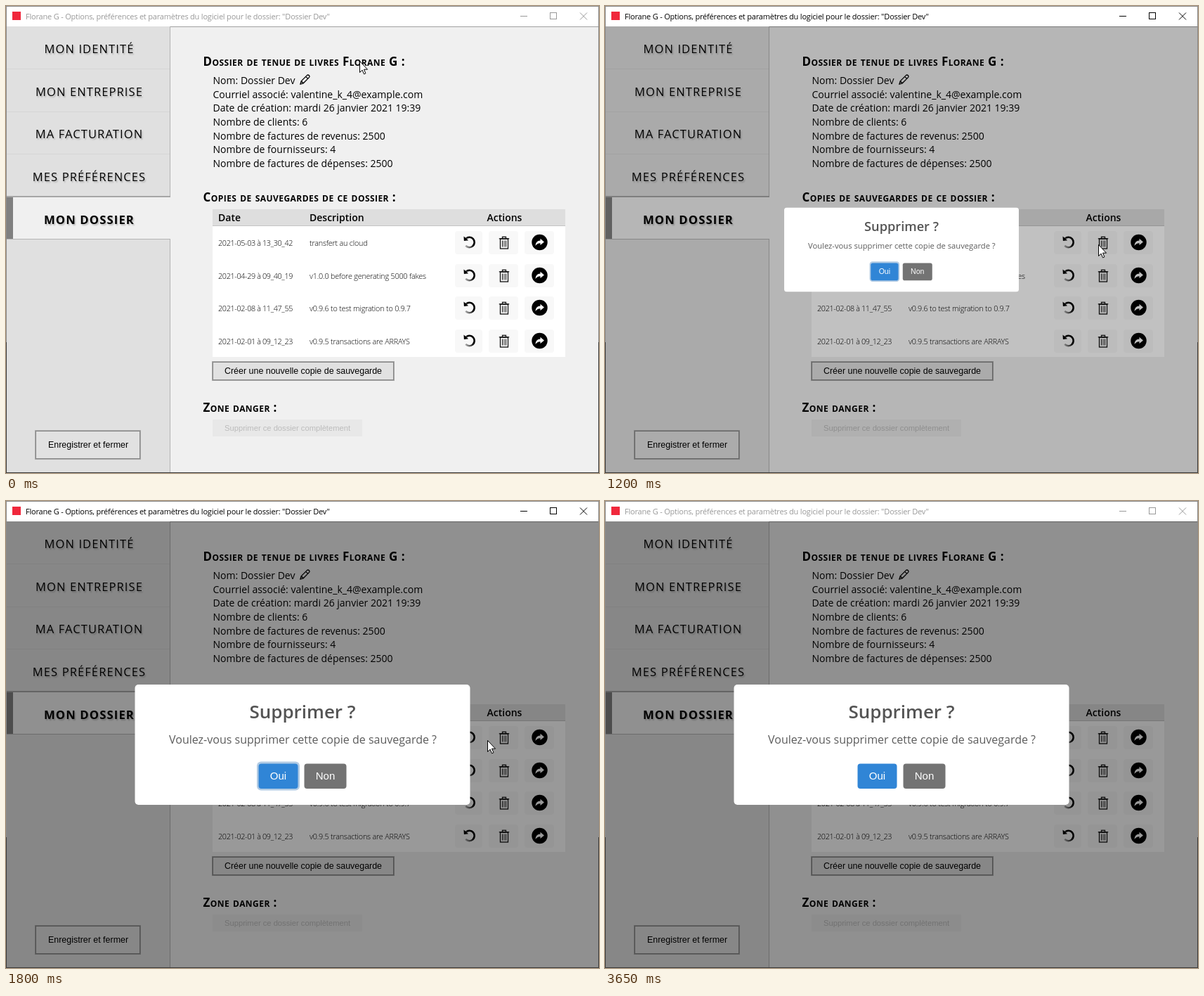
Animation of 844 by 664 pixels, one loop 3800 ms. Source, as an HTML page with a canvas:

```html
<!DOCTYPE html>
<html lang="fr">
<head>
<meta charset="utf-8">
<title>Options du dossier</title>
<style>
html, body { margin: 0; width: 100%; height: 100%; overflow: hidden; background: #f0f0f0; }
canvas { display: block; width: 844px; height: 664px; }
</style>
</head>
<body>
<canvas id="stage" width="844" height="664"></canvas>
<script>
const ctx = document.getElementById('stage').getContext('2d');
const LOOP = 3800, TICK = 50, FADE = 1165;
const SANS = '"Open Sans", "Noto Sans", sans-serif';
const ARIAL = '"Liberation Sans", Arial, sans-serif';
const APP = 'Florane G';

const ROWS = [
  ['2021-05-03 à 13_30_42', 'transfert au cloud'],
  ['2021-04-29 à 09_40_19', 'v1.0.0 before generating 5000 fakes'],
  ['2021-02-08 à 11_47_55', 'v0.9.6 to test migration to 0.9.7'],
  ['2021-02-01 à 09_12_23', 'v0.9.5 transactions are ARRAYS']
];
const INFO = [
  'Nom: Dossier Dev',
  'Courriel associé: valentine_k_4@example.com',
  'Date de création: mardi 26 janvier 2021 19:39',
  'Nombre de clients: 6',
  'Nombre de factures de revenus: 2500',
  'Nombre de fournisseurs: 4',
  'Nombre de factures de dépenses: 2500'
];
const MENU = ['MON IDENTITÉ', 'MON ENTREPRISE', 'MA FACTURATION', 'MES PRÉFÉRENCES', 'MON DOSSIER'];

// pointer path: time, x, y
const PATH = [
  [0, 503, 78], [150, 528, 106], [300, 606, 215], [450, 682, 312], [550, 698, 334],
  [650, 701, 339], [800, 702, 339], [1600, 702, 339], [1800, 685, 340], [1900, 640, 346],
  [2000, 556, 364], [2100, 450, 388], [2150, 421, 394], [2200, 406, 398], [2250, 404, 398],
  [2350, 404, 398], [2500, 400, 397], [2800, 400, 397], [2900, 376, 420], [3000, 292, 480],
  [3100, 186, 548], [3200, 118, 590], [3250, 100, 598], [3300, 95, 604], [3400, 80, 628],
  [3500, 64, 666], [3800, 64, 680]
];

const ARROW = new Path2D('M0 0V16L3.6 12.6L6 18.3L8.4 17.3L6 11.7H11Z');
const HAND = new Path2D('M-1.5 1Q0-1 1.5 1V6.5Q3 5.6 4.4 7.2Q6.1 6.3 7.3 8Q9.6 7.4 10 10V15L8.2 18.5V21H-1V18.8' +
  'Q-3.8 15.5-6 11.5Q-6.4 9-4 9.6L-1.5 12Z');
const PENCIL = new Path2D('M419 111L420.2 106.8L428.6 98.4Q430 97.4 431.4 98.8Q432.7 100.2 431.6 101.4L423.2 109.8Z' +
  'M426.6 100.4L429.6 103.4M420.2 106.8L423.2 109.8');
const SHARE = new Path2D('M-6 5Q-5.6-2 1-2.4V-5.2L6.4-.6L1 4V1.2Q-3.4 1-6 5Z');

function rect(x, y, w, h, color) {
  ctx.fillStyle = color;
  ctx.fillRect(x, y, w, h);
}

function round(x, y, w, h, r, color) {
  ctx.fillStyle = color;
  ctx.beginPath();
  ctx.roundRect(x, y, w, h, r);
  ctx.fill();
}

function line(color, width, ...pts) {
  ctx.strokeStyle = color;
  ctx.lineWidth = width;
  ctx.beginPath();
  for (let i = 0; i < pts.length; i += 4) {
    ctx.moveTo(pts[i], pts[i + 1]);
    ctx.lineTo(pts[i + 2], pts[i + 3]);
  }
  ctx.stroke();
}

function text(str, x, y, font, color = '#000', spacing = 0, align = 'left') {
  ctx.font = font;
  ctx.letterSpacing = spacing + 'px';
  ctx.textAlign = align;
  ctx.fillStyle = color;
  ctx.fillText(str, x, y);
}

function shadow(color, offset, blur) {
  ctx.shadowColor = color;
  ctx.shadowOffsetX = ctx.shadowOffsetY = offset;
  ctx.shadowBlur = blur;
}

const noShadow = () => shadow('transparent', 0, 0);
const heading = (str, y) => text(str, 280.5, y, 'small-caps 700 17px ' + SANS, '#000', 0.45);

// CSS "ease"
function ease(x) {
  if (x <= 0) return 0;
  if (x >= 1) return 1;
  let lo = 0, hi = 1;
  const bez = (a, b, u) => 3 * a * u * (1 - u) ** 2 + 3 * b * u * u * (1 - u) + u ** 3;
  for (let i = 0; i < 24; i++) {
    const mid = (lo + hi) / 2;
    if (bez(0.25, 0.25, mid) < x) lo = mid; else hi = mid;
  }
  return bez(0.1, 1, lo);
}

function popScale(t) {
  const p = (t - 1200) / 300;
  if (p < 0.45) return 0.7 + 0.35 * ease(p / 0.45);
  if (p < 0.8) return 1.05 - 0.1 * ease((p - 0.45) / 0.35);
  return 0.95 + 0.05 * ease((p - 0.8) / 0.2);
}

function pointer(t) {
  const i = Math.max(1, PATH.findIndex(p => p[0] >= t));
  const [t0, x0, y0] = PATH[i - 1], [t1, x1, y1] = PATH[i];
  const k = (t - t0) / (t1 - t0);
  return [Math.round(x0 + (x1 - x0) * k), Math.round(y0 + (y1 - y0) * k)];
}

const inside = ([x, y], l, t, r, b) => x >= l && x <= r && y >= t && y <= b;

function titleBar(active) {
  rect(0, 0, 844, 29, '#fff');
  rect(9, 8, 12, 12, '#f0283c');
  const ink = active ? '#000' : '#999';
  text(APP + ' - Options, préférences et paramètres du logiciel pour le dossier: "Dossier Dev"',
    28, 19, '11px ' + SANS, ink, -0.2);
  line(ink, 1, 732, 14.5, 742, 14.5, 817, 9.5, 827, 19.5, 827, 9.5, 817, 19.5);
  ctx.strokeRect(774.5, 9.5, 9, 9);
}

function sidebar() {
  rect(1, 29, 233, 635, '#e0e0e0');
  for (const y of [89, 150, 210]) rect(1, y, 232, 1, '#d6d6d6');
  rect(233, 29, 1, 635, '#b4b4b4');
  rect(1, 270, 233, 2, '#a6a6a6');
  rect(1, 272, 233, 59, '#f0f0f0');
  rect(1, 272, 9, 59, '#808080');
  rect(1, 331, 233, 1, '#b4b4b4');
  shadow('rgba(0,0,0,.22)', 1.5, 2);
  MENU.forEach((label, i) => {
    const font = i === 4 ? '700 16.7px ' : '16.5px ';
    text(label, 118.5, Math.round(67 + i * 60.7), font + SANS, '#000', 1.1, 'center');
  });
  noShadow();
}

function button(label, x, y, w, h, tx, ty) {
  rect(x, y, w, h, '#a6a6a6');
  rect(x + 1, y + 1, w - 2, h - 2, '#868686');
  rect(x + 2, y + 2, w - 4, h - 4, '#e1e1e1');
  text(label, tx, ty, '12.45px ' + ARIAL);
}

function undoIcon(x, y) {
  const g = ctx.createLinearGradient(x + 4, y + 2, x - 5, y + 8);
  g.addColorStop(0, '#000');
  g.addColorStop(1, '#bbb');
  ctx.strokeStyle = g;
  ctx.lineWidth = 2.6;
  ctx.beginPath();
  ctx.arc(x, y, 7.2, -2.3, 2.4);
  ctx.stroke();
  ctx.fillStyle = '#000';
  ctx.beginPath();
  ctx.moveTo(x - 8, y - 8.6);
  ctx.lineTo(x - 7.6, y - 2);
  ctx.lineTo(x - 1.4, y - 2.8);
  ctx.fill();
}

function trashIcon(x, y) {
  line('#111', 1.3, x - 7.2, y - 5.7, x + 7.2, y - 5.7);
  ctx.strokeRect(x - 5.5, y - 5.5, 11, 14);
  ctx.strokeRect(x - 2.5, y - 8.2, 5, 2.5);
  line('#111', 1, x - 2.5, y - 3, x - 2.5, y + 6, x, y - 3, x, y + 6, x + 2.5, y - 3, x + 2.5, y + 6);
}

function shareIcon(x, y) {
  ctx.fillStyle = '#000';
  ctx.beginPath();
  ctx.arc(x, y, 11.2, 0, 7);
  ctx.fill();
  ctx.save();
  ctx.translate(x, y);
  ctx.fillStyle = '#fff';
  ctx.fill(SHARE);
  ctx.restore();
}

function table(hover) {
  rect(294, 289, 502, 24, '#dedede');
  rect(294, 312, 502, 1, '#c4c4c4');
  rect(294, 313, 502, 186, '#fff');
  const head = '600 14px ' + SANS, cell = '300 10.8px ' + SANS;
  text('Date', 302, 306, head);
  text('Description', 432, 306, head);
  text('Actions', 709.5, 306, head, '#000', 0, 'center');
  ROWS.forEach(([date, note], i) => {
    const y = Math.round(336.4 + i * 46.5);
    text(date, 302, y + 5, cell, '#000', -0.35);
    text(note, 432, y + 5, cell, '#000', -0.2);
    round(639, y - 16, 39, 33, 4, '#f8f8f8');
    round(738, y - 16, 42, 33, 4, '#f8f8f8');
    if (hover && !i) {
      shadow('rgba(0,0,0,.7)', 1, 2);
      round(686, y - 17, 45, 35, 5, '#3c5c64');
      noShadow();
      round(687, y - 16, 43, 33, 4, '#1fd9ff');
    } else {
      round(687, y - 16, 42, 33, 4, '#f8f8f8');
    }
    undoIcon(659.5, y);
    trashIcon(709, y + 0.5);
    shareIcon(759.5, y);
  });
}

function content(hover) {
  rect(234, 29, 610, 635, '#f0f0f0');
  rect(234, 29, 610, 1, '#a0a0a0');
  heading(`Dossier de tenue de livres ${APP} :`, 85);
  INFO.forEach((s, i) => text(s, 294.5, Math.round(111.2 + i * 19.6), '14px ' + SANS));
  ctx.strokeStyle = '#000';
  ctx.lineWidth = 1.3;
  ctx.stroke(PENCIL);
  heading('Copies de sauvegardes de ce dossier :', 278);
  table(hover);
  button('Créer une nouvelle copie de sauvegarde', 293, 505, 260, 28, 311, 523);
  heading('Zone danger :', 577);
  rect(294, 588, 213, 24, '#e8e8e8');
  text('Supprimer ce dossier complètement', 311, 604, '11.2px ' + ARIAL, '#bcbcbc');
}

function dialog(scale, focus, hover) {
  ctx.save();
  ctx.translate(422, 346.5);
  ctx.scale(scale, scale);
  ctx.translate(-422, -346.5);
  round(183.5, 261, 477, 171, 5, '#fff');
  text('Supprimer ?', 422, 309, '600 26px ' + SANS, '#545454', 0, 'center');
  text('Voulez-vous supprimer cette copie de sauvegarde ?', 422.5, 345, '16px ' + SANS, '#5c5c5c', 0, 'center');
  if (focus) round(357, 370.5, 61, 41, 6, '#b2cbe4');
  round(359.5, 373.5, 56, 35.5, 4, hover === 'yes' ? '#2b78c1' : '#3085d6');
  round(424.5, 373.5, 60, 35.5, 4, hover === 'no' ? '#676767' : '#737373');
  text('Oui', 387.5, 396, '15px ' + ARIAL, '#fff', 0, 'center');
  text('Non', 454.5, 396, '15px ' + ARIAL, '#fff', 0, 'center');
  ctx.restore();
}

function cursor([x, y], hand) {
  ctx.save();
  ctx.translate(x + 0.5, y + 0.5);
  ctx.lineWidth = hand ? 1.3 : 1;
  ctx.lineJoin = 'round';
  ctx.strokeStyle = '#000';
  ctx.fillStyle = '#fff';
  const shape = hand ? HAND : ARROW;
  ctx.fill(shape);
  ctx.stroke(shape);
  if (hand) line('#000', 1, 1.5, 6.5, 1.5, 10, 4.4, 7.2, 4.4, 10.5, 7.3, 8, 7.3, 11);
  ctx.restore();
}

function windowEdge() {
  rect(0, 0, 844, 1, '#8a8a8a');
  for (const x of [0, 843]) {
    rect(x, 0, 1, 478, '#8a8a8a');
    rect(x, 478, 1, 186, '#3a3a3a');
  }
  rect(0, 663, 844, 1, '#3a3a3a');
}

function draw(t) {
  const at = pointer(t);
  const modal = t > FADE, shown = t >= 1200;
  const trash = !modal && inside(at, 687, 320, 729, 353);
  let hover = '';
  if (shown && inside(at, 360, 373, 415, 409)) hover = 'yes';
  else if (shown && inside(at, 425, 373, 484, 409)) hover = 'no';

  content(trash);
  sidebar();
  button('Enregistrer et fermer', 41, 603, 151, 42, 60, 628);
  if (modal) rect(1, 29, 842, 634, `rgba(0,0,0,${0.4 * ease((t - FADE) / 100)})`);
  titleBar(t >= 1100 && t < 3650);
  windowEdge();
  if (shown) dialog(popScale(Math.min(t, 1500)), t < 3650, hover);
  cursor(at, trash || hover !== '');
}

const start = performance.now();
function loop(now) {
  const t = Math.max(0, now - start) % LOOP;
  draw(Math.floor(t / TICK) * TICK);
  requestAnimationFrame(loop);
}
draw(0);
requestAnimationFrame(loop);
</script>
</body>
</html>
```
